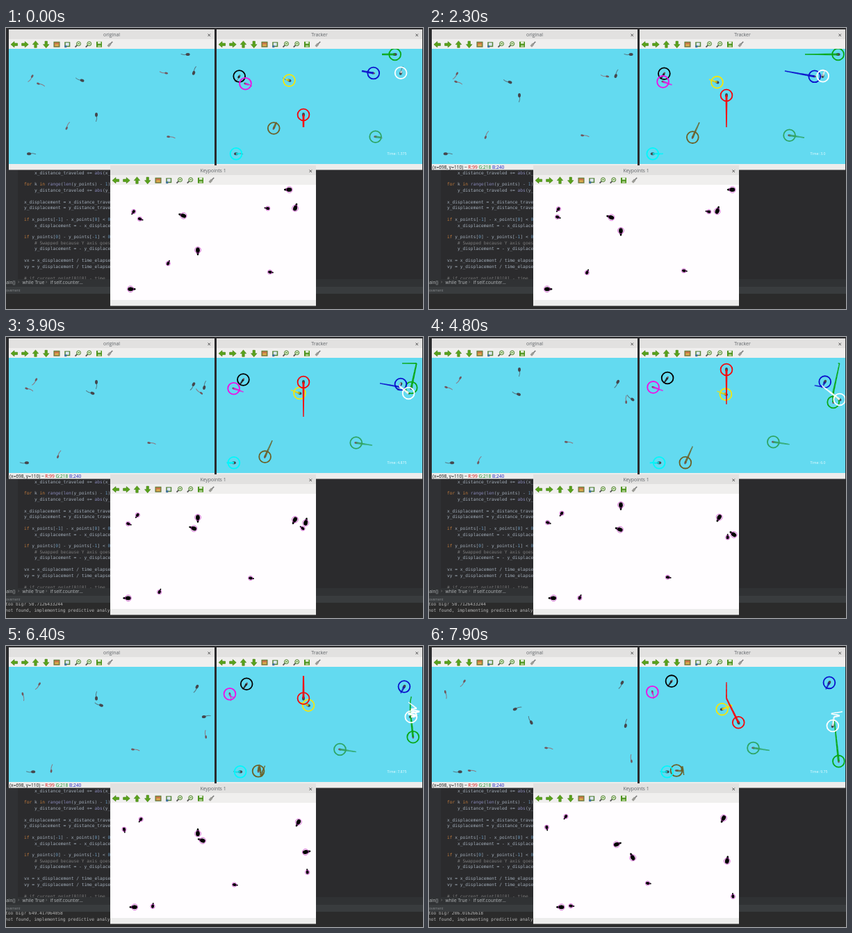
Write an HTML page with a canvas that moves like this. It is 600 by 405 pixels and loops after 8 s.

```html
<!DOCTYPE html>
<html>
<head>
<meta charset="utf-8">
<style>
html, body { margin: 0; width: 100%; height: 100%; overflow: hidden; background: #2b2b2b; }
canvas { display: block; }
</style>
</head>
<body>
<canvas id="stage" width="600" height="405"></canvas>
<script>
const ctx = document.getElementById('stage').getContext('2d');
const LOOP = 8000, WATER = '#63daf0', SANS = '"Open Sans", sans-serif', MONO = '"DejaVu Sans Mono", monospace';
const START = -9, TRAIL = 25;

// Each fish swims in straight legs: leg(from, to) counts the steps spent in that stretch.
const fishes = [
  { color: '#0aa818', big: s => s < 35, swim: leg => [
    541 + 2.07 * leg(START, 15) - 0.5 * leg(15, 33) + 0.25 * leg(39, 70),
    38 + 2.33 * leg(15, 70)] },
  { color: '#0b10cc', big: s => s > 25, swim: leg => [
    512 + 1.86 * leg(START, 20) + 0.2 * leg(20, 70),
    62 + 0.34 * leg(START, 20) - 0.38 * leg(20, 70)] },
  { color: '#ffffff', big: s => s < 26 || s > 34, swim: leg => [
    569 - 0.1 * leg(START, 20) + 1.3 * leg(20, 39) - 0.5 * leg(39, 55) - 0.13 * leg(55, 70) - 7 * Math.sin(leg(39, 55) * Math.PI / 4),
    62 + 0.31 * leg(START, 20) + leg(20, 39) + 0.75 * leg(39, 55) + 0.87 * leg(55, 70)] },
  { color: '#000000', big: () => false, swim: leg => [
    334 + 0.19 * leg(START, 70),
    72 - 0.27 * leg(START, 70)] },
  { color: '#f00fe6', big: () => false, swim: leg => [
    349.5 - 0.56 * leg(START, 39) - 0.04 * leg(39, 70),
    82 - 0.2 * leg(START, 70)] },
  { color: '#f6e60a', big: () => true, swim: leg => [
    403 + 0.5 * leg(START, 57) - 1.1 * leg(57, 70),
    74 + 0.18 * leg(START, 57) + 0.4 * leg(57, 70)] },
  { color: '#f4080c', big: () => true, swim: leg => [
    428 + 1.15 * leg(55, 70),
    143 - 2 * leg(START, 41) + 2.32 * leg(41, 70)] },
  { color: '#6b6128', big: () => false, swim: leg => [
    389 - 0.42 * leg(START, 39) - 0.36 * leg(39, 55) - 0.47 * leg(55, 70),
    136 + 0.94 * leg(START, 39) - 0.05 * leg(39, 70) + 7 * Math.sin(leg(39, 55) * Math.PI / 8)] },
  { color: '#2fa565', big: () => false, swim: leg => [
    540 - 0.93 * leg(START, 70),
    158 - 0.14 * leg(START, 70)] },
  { color: '#00f8fc', big: () => true, swim: leg => [
    337 - 0.66 * leg(START, 20) + leg(20, 30) + 0.37 * leg(30, 70),
    181.3] }
];

const code = `
    x_distance_traveled += abs(x_points[k]

for k in range(len(y_points) - 1):
    y_distance_traveled += abs(y_points[k]

x_displacement = x_distance_traveled
y_displacement = y_distance_traveled

if x_points[-1] - x_points[0] < 0:
    x_displacement = - x_displacement

if y_points[0] - y_points[-1] < 0:
    # Swapped because Y axis goes down
    y_displacement = - y_displacement

vx = x_displacement / time_elapsed
vy = y_displacement / time_elapsed

# if current_point[0][0] - time_`.split('\n');

function rect(x, y, w, h, color) {
  ctx.fillStyle = color;
  ctx.fillRect(x, y, w, h);
}

function text(str, x, y, size, color, family = SANS, align = 'left') {
  ctx.font = `${size}px ${family}`;
  ctx.textAlign = align;
  ctx.textBaseline = 'middle';
  ctx.fillStyle = color;
  ctx.fillText(str, x, y);
  return x + ctx.measureText(str).width;
}

function line(points, color, width) {
  ctx.beginPath();
  points.forEach(p => ctx.lineTo(...p));
  ctx.strokeStyle = color;
  ctx.lineWidth = width;
  ctx.stroke();
}

function shape(points, color) {
  ctx.beginPath();
  points.forEach(p => ctx.lineTo(...p));
  ctx.fillStyle = color;
  ctx.fill();
}

function oval(x, y, rx, ry, color) {
  ctx.beginPath();
  ctx.ellipse(x, y, rx, ry, 0, 0, 7);
  ctx.fillStyle = color;
  ctx.fill();
}

function ring(x, y, r, color, width) {
  ctx.beginPath();
  ctx.arc(x, y, r, 0, 7);
  ctx.strokeStyle = color;
  ctx.lineWidth = width;
  ctx.stroke();
}

function clipped(x, y, w, h, draw) {
  ctx.save();
  ctx.beginPath();
  ctx.rect(x, y, w, h);
  ctx.clip();
  draw();
  ctx.restore();
}

function placed(x, y, angle, draw) {
  ctx.save();
  ctx.translate(x, y);
  ctx.rotate(angle);
  draw();
  ctx.restore();
}

function position(fish, s) {
  return fish.swim((from, to) => Math.min(Math.max(s, from), to) - from);
}

function pose(fish, s) {
  const [x, y] = position(fish, s), [px, py] = position(fish, s - 2);
  return { x, y, angle: Math.atan2(y - py, x - px), big: fish.big(s) };
}

function drawCodeLine(str, y) {
  let x = 26;
  if (str.includes('#')) return text(str, x, y, 6.25, '#7c7c7c', MONO);
  for (const part of str.split(/\b(for|in|if|range|len|abs|\d)\b/)) {
    const color = /^(for|in|if)$/.test(part) ? '#c07a3c'
      : /^\d$/.test(part) ? '#6897bb'
      : /^(range|len|abs)$/.test(part) ? '#8888b8' : '#a3aeba';
    x = text(part, x, y, 6.25, color, MONO);
  }
}

function drawEditor(t) {
  rect(0, 0, 600, 405, '#2b2b2d');
  rect(0, 204, 17, 158, '#303134');
  code.forEach((str, row) => drawCodeLine(str, 200.5 + row * 8.445));
  rect(0, 362, 600, 11, '#303234');
  text('main()', -6, 367, 6.6, '#b5b8ba');
  text('›', 17, 366.5, 7, '#888888');
  text('while True', 23.5, 367, 6.6, '#b5b8ba');
  text('›', 57, 366.5, 7, '#888888');
  text('if self.counter...', 63.5, 367, 6.6, '#b5b8ba');
  rect(0, 373, 600, 10, '#393c3e');
  text('ovement', 0, 378.5, 5, '#85898c');
  rect(0, 383, 600, 22, '#2b2b2b');
  if (t >= 3000) clipped(0, 383, 150, 22, () => {
    const size = t < 5300 ? '50.7126433244' : t < 7300 ? '649.417064058' : '206.01626618';
    text('too big? ' + size, -1, 385, 6.25, '#b8b8b8', MONO);
    text('not found, implementing predictive analysis', -1, 394, 6.25, '#b8b8b8', MONO);
  });
}

function drawArrow(x, y, angle) {
  placed(x, y, angle, () => {
    shape([[-5, 0], [0, -4.2], [0, -1.7], [4.6, -1.7], [4.6, 1.7], [0, 1.7], [0, 4.2]], '#5aa21c');
    ctx.closePath();
    ctx.strokeStyle = '#3d7d0c';
    ctx.lineWidth = 0.6;
    ctx.stroke();
  });
}

function drawToolbar(x, y) {
  const icon = [
    () => drawArrow(0, 0, 0),
    () => drawArrow(0, 0, Math.PI),
    () => drawArrow(0, 0, Math.PI / 2),
    () => drawArrow(0, 0, -Math.PI / 2),
    () => { rect(-4.5, -4, 9, 8, '#4f7f2e'); rect(-3.5, -3, 7, 6, '#c8764a'); rect(-2.5, 0, 5, 2, '#d8c04b'); },
    () => { rect(-4, -3.5, 8, 7, '#55833b'); rect(-2.5, -2.5, 5, 4.5, '#dce6f0'); rect(-4, 1.5, 3, 3, '#3f6fa0'); },
    drawZoom,
    drawZoom,
    () => { rect(-4, -4, 8, 8, '#4c921c'); rect(-2, -4, 4.5, 3, '#e4eedb'); rect(-2, 1, 4.5, 3, '#a9cd88'); },
    () => { line([[4, -4], [0, 0]], '#777777', 1.6); line([[1, -1], [-2.5, 3]], '#9b9b96', 3.4); }
  ];
  icon.forEach((draw, i) => placed(x + 8 + i * 15.25, y, 0, draw));
}

function drawZoom() {
  line([[-1, 1], [-4, 4]], '#555555', 1.7);
  oval(1, -1, 3, 3, '#dcebd0');
  ring(1, -1, 3, '#4c7d2b', 1);
  rect(-0.5, -1.5, 3, 1, '#4c8d1b');
}

function drawWindow(x, y, title, background, content) {
  rect(x, y, 296, 202.5, '#ededec');
  rect(x, y, 296, 14, '#e2e1e0');
  rect(x, y + 14, 296, 14, '#f0efee');
  text(title, x + 148, y + 8.5, 6.9, '#606468', SANS, 'center');
  line([[x + 286.5, y + 6.5], [x + 290, y + 10]], '#555555', 1);
  line([[x + 290, y + 6.5], [x + 286.5, y + 10]], '#555555', 1);
  drawToolbar(x, y + 21.7);
  rect(x, y + 28, 296, 166, background);
  clipped(x, y + 28, 296, 166, content);
}

function drawFish(fish, s, dx) {
  const { x, y, angle, big } = pose(fish, s);
  placed(x + dx, y, angle, () => {
    ctx.beginPath();
    ctx.moveTo(0, 0);
    ctx.quadraticCurveTo(-6, 1.5, -10, -0.5);
    ctx.strokeStyle = big ? '#557883' : '#8c7880';
    ctx.lineWidth = 1;
    ctx.stroke();
    oval(0, 0, big ? 3 : 2.4, big ? 2 : 1.4, big ? '#45474d' : '#70585e');
  });
}

function drawTrack(fish, s) {
  const { x, y } = pose(fish, s);
  for (let i = Math.max(s - TRAIL, START); i < s; i++) {
    const freshness = 1 - (s - i) / TRAIL;
    line([position(fish, i), position(fish, i + 1)], fish.color, 1.4 + 1.6 * freshness);
  }
  ring(x, y, 8.4, fish.color, 1.8);
}

function drawKeypoint(fish, s) {
  const { x, y, angle, big } = pose(fish, s), size = big ? 1 : 0.7;
  placed(x - 152, y + 195, angle, () => {
    ctx.scale(size, size);
    oval(0, 0, 3.8, 2.9, '#000000');
    shape([[0, -2.7], [-7.5, -0.9], [-7.5, 0.9], [0, 2.7]], '#000000');
  });
  ring(x - 152, y + 195, 4.4 * size, '#c63fc6', 0.8);
}

function drawStatus() {
  let x = 5;
  const parts = [['(x=698, y=110) ~ ', '#111111'], ['R:99 ', '#d81515'], ['G:218 ', '#118b22'], ['B:240', '#1a20bd']];
  for (const [str, color] of parts) x = text(str, x, 201.4, 6.6, color);
}

function elapsed(s) {
  const skipped = (s > 8) + (s > 15) + (s > 48);
  const value = 1.375 + 0.125 * (s - skipped);
  return Number.isInteger(value) ? value.toFixed(1) : String(value);
}

function stepAt(t) {
  if (t < 1100) return t < 100 ? 0 : 1;
  const slot = Math.floor(t / 100);
  return slot - (slot % 5 === 2 ? 1 : 0) - 9;
}

function draw(t) {
  const s = stepAt(t);
  ctx.lineJoin = 'round';
  drawEditor(t);
  drawWindow(4, 2, 'original', WATER, () => fishes.forEach(f => drawFish(f, s, -298)));
  if (t >= 1100) clipped(4, 196, 296, 8.5, drawStatus);
  drawWindow(303, 2, 'Tracker', WATER, () => {
    fishes.forEach(f => drawFish(f, s, 0));
    fishes.forEach(f => drawTrack(f, s));
    text('Time: ' + elapsed(s), 548.5, 182, 5.2, '#e9fbff');
  });
  drawWindow(150, 198, 'Keypoints 1', '#fffdff', () => fishes.forEach(f => drawKeypoint(f, s)));
}

function tick() {
  draw(performance.now() % LOOP);
  requestAnimationFrame(tick);
}
tick();
</script>
</body>
</html>
```
